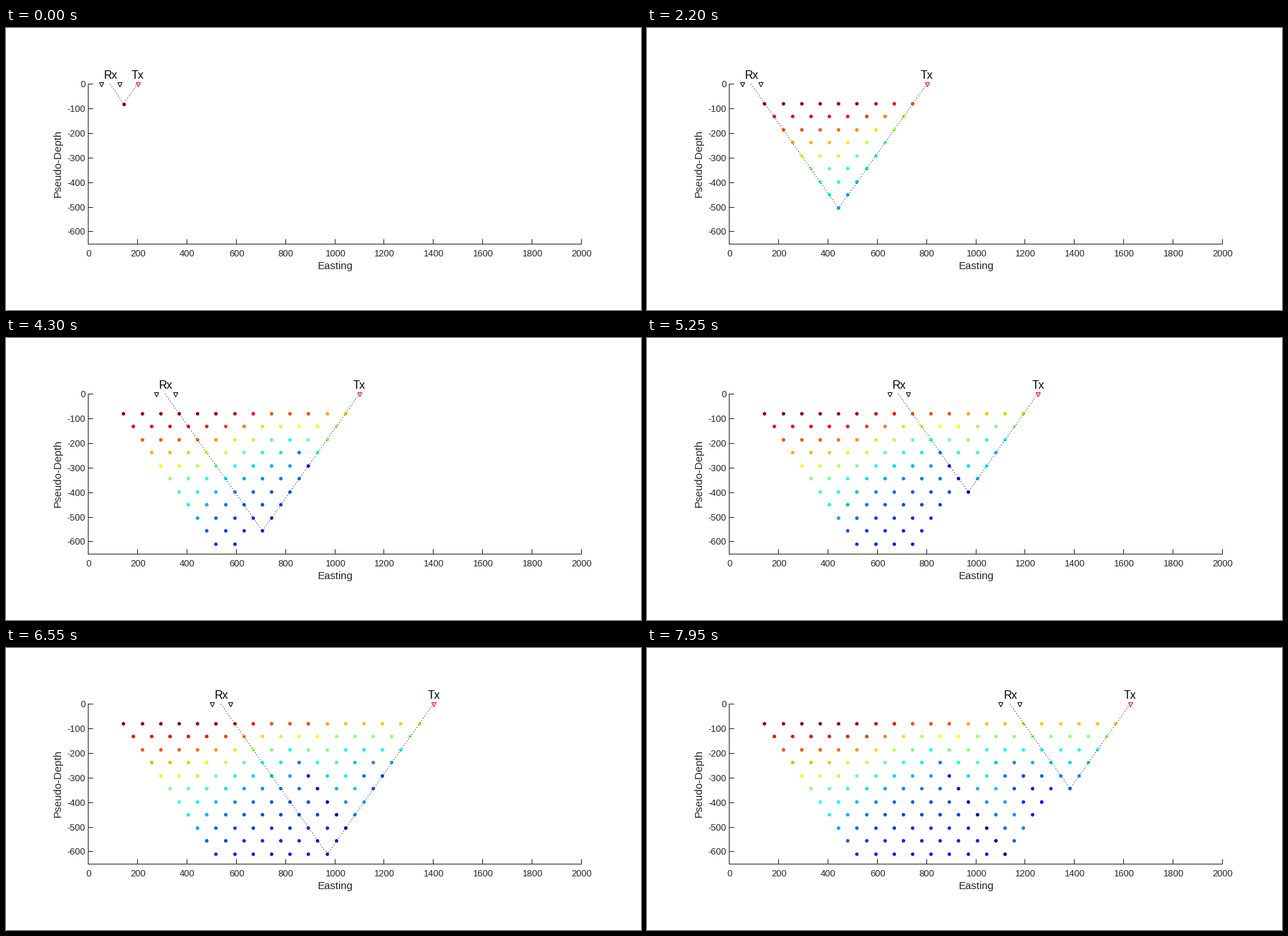
A matplotlib script for the animation above (8 s loop, 900x400 px).

```python
import numpy as np
import matplotlib.pyplot as plt
from matplotlib.animation import FuncAnimation

plt.rcParams["font.family"] = "Liberation Sans"
W, H, DPI = 900, 400, 100
PT = 72 / DPI                      # points per pixel
FRAMES, STEP = 160, 75
LEVELS = 11
INK = (0.15, 0.15, 0.15)


def px(easting):
    return 116.8 + 0.3492 * easting


def py(depth):
    return 79.4 - 0.3492 * depth


def mid(v):
    """Centre of the pixel holding v."""
    return np.floor(v) + 0.5


def peak(v, centre, width):
    return np.exp(-((v - centre) / width) ** 2)


def level(n, k):
    """Reading (0 to 1) at depth level n for transmitter k."""
    i = k - n + 1                                  # receiver
    high = max(107 - 9 * n, 48)
    low = 13 + 55 * np.exp(-(n - 1) / 3)
    value = low + (high - low) / (1 + np.exp(k - 7.5))
    deep = min((n - 1) / 4, 1)
    value += 11 * peak(i, 9.7, 1)
    value -= deep * (14 * peak(i, 8, 0.5) + 9 * peak(i, 12, 1.4))
    return np.clip(value / 100, 0, 1)


def jet(v):
    return tuple(np.clip(1.5 - abs(4 * v - c), 0, 1) for c in (3, 2, 1))


def sweep():
    """Yield transmitter and level of every reading in order."""
    for k in range(FRAMES):
        for n in range(1, min(k + 1, LEVELS) + 1):
            yield k, n


shots = [s for s, _ in zip(sweep(), range(FRAMES))]
ks, ns = np.array(shots).T
tx = 200 + STEP * ks
rx = 50 + STEP * (ks - ns + 1)
rx_mid = rx + STEP / 2
dot_x = mid(px((tx + rx_mid) / 2))
dot_y = mid(py(-(tx - rx_mid) / 2 * np.sqrt(2)))
colors = [jet(level(n, k)) for k, n in shots]

fig = plt.figure(figsize=(W / DPI, H / DPI), dpi=DPI, facecolor="white")
ax = fig.add_axes([0, 0, 1, 1])
ax.set_xlim(0, W)
ax.set_ylim(H, 0)
ax.axis("off")


def line(xs, ys):
    ax.plot(xs, ys, color=INK, lw=PT, solid_capstyle="butt",
            snap=False, zorder=1)


def label(x, y, s, size, color=INK, **kw):
    kw.setdefault("ha", "center")
    return ax.text(x, y, s, fontsize=size * PT, color=color,
                   va="baseline", zorder=5, **kw)


left, base, top = mid(px(0)), mid(py(-650)), mid(py(0))
line([left, left], [top - 0.5, base + 0.5])
line([left, mid(px(2000)) + 0.5], [base, base])
for e in range(0, 2001, 200):
    x = mid(px(e))
    line([x, x], [base, base - 7])
    label(x + 0.3, 324.5, str(e), 13)
for d in range(0, -601, -100):
    y = mid(py(d))
    line([left, left + 7], [y, y])
    label(112.5, y + 4.5, str(d), 13, ha="right")
label(466.5, 342, "Easting", 15)
label(78, 191.5, "Pseudo-Depth", 15, rotation=90, rotation_mode="anchor")

dots = ax.scatter([], [], s=(5 * PT) ** 2, linewidths=0, snap=False, zorder=2)
ray, = ax.plot([], [], color="black", lw=PT, ls=(0, (1, 3)),
               dash_capstyle="butt", snap=False, zorder=3)


def triangles(color):
    return ax.plot([], [], "v", ms=5.5 * PT, mfc="none", mec=color,
                   mew=PT, snap=False, zorder=4)[0]


rx_marks, tx_mark = triangles("black"), triangles("red")
rx_text = label(0, 72, "Rx", 16, "black")
tx_text = label(0, 72, "Tx", 16, "black")


def draw(f):
    dots.set_offsets(np.column_stack([dot_x[:f + 1], dot_y[:f + 1]]))
    dots.set_facecolors(colors[:f + 1])
    a, b = mid(px(rx_mid[f])), mid(px(tx[f]))
    x, y = dot_x[f], dot_y[f]
    ray.set_data([a, x, np.nan, b, x], [top, y, np.nan, top, y])
    rx_marks.set_data(mid(px(rx[f] + np.array([0, STEP]))), [top, top])
    tx_mark.set_data([b], [top])
    rx_text.set_x(a + 0.7)
    tx_text.set_x(b + 0.5)
    return dots, ray, rx_marks, tx_mark, rx_text, tx_text


anim = FuncAnimation(fig, draw, frames=FRAMES, interval=50,
                     repeat=True, repeat_delay=0, blit=False)
plt.show()
```
